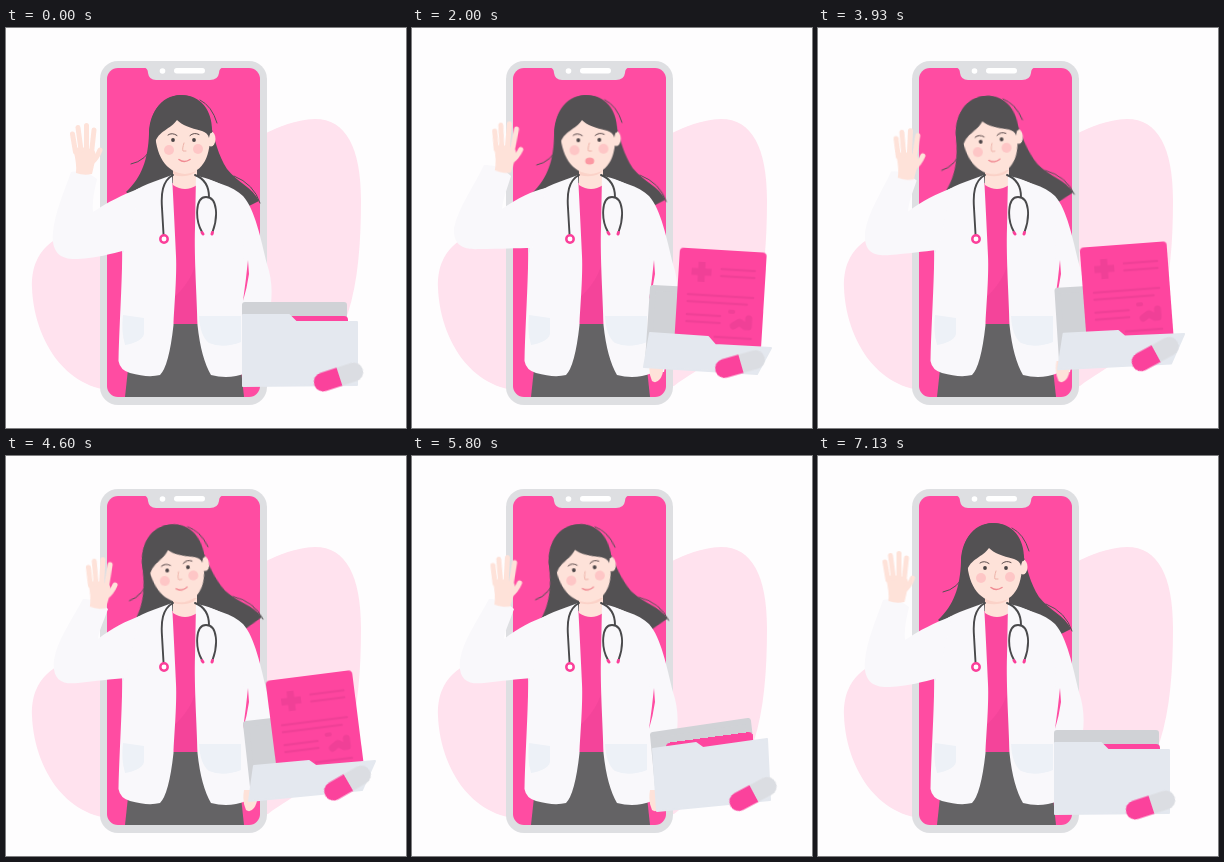
An HTML page for the animation above (7200 ms loop, 400 by 400 pixels).

```html
<!DOCTYPE html>
<html lang="en">
<head>
<meta charset="utf-8">
<title>Online doctor</title>
<style>
html, body { margin: 0; width: 100%; height: 100%; overflow: hidden; background: #fefdfe; }
svg { display: block; width: 100%; height: 100%; }
.line { fill: none; stroke-linecap: round; stroke-linejoin: round; }
.hair { fill: #535153; }
.skin { fill: #fee2d9; }
.coat { fill: #f9f8fb; }
.screen { fill: #ff4ca2; }
.move { animation: 7.2s linear infinite; }

.head { transform-origin: 180px 150px; animation-name: head; }
.hand { transform-origin: 78px 143px; animation-name: hand; }
.sleeve { animation-name: sleeve; }
.talk { transform-origin: 178px 133px; animation-name: talk; }
.smile { animation-name: smile; }
.back { animation-name: back; }
.front { animation-name: front; }
.paper { animation-name: paper; }
.pill { animation-name: pill; }
.grip { animation-name: grip; }

@keyframes head {
  0%, 3%, 100% { transform: rotate(0deg); }
  15.7%, 18% { transform: rotate(-9deg); }
  27.8% { transform: rotate(-1deg); }
  32% { transform: rotate(0deg); }
  44.4% { transform: rotate(-4deg); }
  63.9%, 70% { transform: rotate(-9deg); }
  80.6% { transform: rotate(-8deg); }
  99% { transform: rotate(0deg); }
}
@keyframes hand {
  0%, 100% { transform: translate(0, 0); }
  5% { transform: translate(-3px, 0) rotate(-2deg); }
  15.7% { transform: translate(11px, -5px) rotate(5deg); }
  27.8% { transform: translate(13px, -2px) rotate(5deg); }
  42% { transform: translate(5px, 3px) rotate(2deg); }
  44.4% { transform: translate(5.5px, 4px) rotate(2deg); }
  63.9%, 69% { transform: translate(14px, 6px) rotate(3deg); }
  80.6% { transform: translate(12.5px, 4px) rotate(3deg); }
  99% { transform: translate(.5px, 0); }
}
@keyframes sleeve {
  0%, 5%, 99%, 100% { d: path("M134 160C116 167 102 174 87 184C86 174 88 164 91 151Q78 141 65 144C58 164 49 184 47 204C45 224 54 232 72 231C90 230 105 226 120 222Z"); }
  15.7%, 27.8% { d: path("M134 160C120 163 106 170 90 181C91 171 95 161 99 148Q88 136 72 137C62 158 46 180 42 200C41 218 52 222 68 221C88 221 105 220 120 220Z"); }
  44.4% { d: path("M134 160C116 167 102 174 88 184C88 174 91 164 95 152Q83 142 69 144C61 164 49 184 46 204C45 223 54 228 72 227C90 226 105 224 120 222Z"); }
  63.9%, 80.6% { d: path("M134 160C120 165 106 172 92 183C93 174 98 165 102 153Q91 142 77 143C66 164 51 184 48 204C46 223 55 229 72 227C90 225 105 223 120 222Z"); }
}
@keyframes talk {
  0%, 9%, 33%, 100% { opacity: 0; transform: scale(1, .3); }
  12%, 21%, 30% { opacity: 1; transform: scale(1, .7); }
  15.7%, 18%, 24%, 27.8% { opacity: 1; transform: scale(1); }
}
@keyframes smile {
  0%, 9%, 33%, 100% { opacity: 1; }
  12%, 30% { opacity: 0; }
}
@keyframes back {
  0%, 99%, 100% { d: path("M239 277L338 277L338 300L239 354Z"); }
  11% { d: path("M239 275L338 277L338 300L237 352Z"); }
  15.7% { d: path("M239 267L338 270L338 300L236 346Z"); }
  22%, 27.8% { d: path("M241 260L339 265L335 325L236 333Z"); }
  44.4% { d: path("M239 257L338 257L338 318L240 331Z"); }
  63.9% { d: path("M240 268L336 257L347 315L248 340Z"); }
  71%, 80.6% { d: path("M241 279L336 265L340 300L248 351Z"); }
}
@keyframes front {
  0%, 99%, 100% { d: path("M237 287L283 287L290 294L351 294L351 357L237 358Z"); }
  11% { d: path("M237 286L284 286L291 293L352 295L350 356L235 355Z"); }
  15.7% { d: path("M238 283L287 285L294 291L352 295L349 351L234 349Z"); }
  22%, 27.8% { d: path("M238 305L296 309L303 317L359 320L345 346L232 339Z"); }
  44.4% { d: path("M243 301L297 301L303 307L363 307L350 337L237 337Z"); }
  63.9% { d: path("M248 310L303 305L310 310L369 305L356 334L243 345Z"); }
  71%, 80.6% { d: path("M241 293L284 287L291 292L355 283L358 344L245 355Z"); }
}
@keyframes paper {
  0%, 99%, 100% { transform: translate(255px, 288px); }
  11% { transform: translate(255px, 286px) rotate(1deg); }
  15.7% { transform: translate(254px, 276px) rotate(2.5deg); }
  22%, 27.8% { transform: translate(268px, 219.5px) rotate(3.5deg); }
  44.4% { transform: translate(264px, 214px) rotate(-1.2deg); }
  63.9% { transform: translate(259.5px, 225px) rotate(-7.2deg); }
  71%, 80.6% { transform: translate(254px, 287px) rotate(-7.5deg); }
}
@keyframes pill {
  0%, 99%, 100% { transform: translate(332.5px, 349px) rotate(-18deg); }
  11% { transform: translate(331px, 347px) rotate(-17deg); }
  15.7% { transform: translate(329px, 344px) rotate(-16deg); }
  22%, 27.8% { transform: translate(328px, 336px) rotate(-16deg); }
  44.4% { transform: translate(332.5px, 325px) rotate(-27deg); }
  63.9% { transform: translate(341.5px, 327px) rotate(-30deg); }
  71%, 80.6% { transform: translate(341px, 338px) rotate(-28deg); }
}
@keyframes grip {
  0%, 99%, 100% { transform: translate(2px, 2px); }
  15.7%, 27.8% { transform: translate(0, 0); }
  44.4% { transform: translate(1px, -1px); }
  63.9%, 80.6% { transform: translate(0, 1px); }
}
</style>
</head>
<body>
<svg viewBox="0 0 400 400">
  <defs>
    <clipPath id="pocket"><path d="M220 180H390V332H220Z"/></clipPath>
  </defs>

  <path fill="#ffe2ee" d="M50 211C32 222 25 240 26 260C28 310 58 362 112 363C170 366 220 365 262 358C285 340 328 322 342 285C352 254 355 215 355 172C355 120 340 91 309 91C288 92 275 98 256 107L130 200Z"/>

  <!-- phone -->
  <rect x="94" y="33" width="167" height="344" rx="18" fill="#dedfe2"/>
  <rect class="screen" x="101" y="40" width="153" height="329" rx="11"/>
  <path fill="#dedfe2" d="M137 39Q142 40 142 45Q143 52 150 52H204Q212 52 213 45Q213 40 218 39Z"/>
  <circle cx="156.500" cy="43" r="2.800" fill="#fff"/>
  <rect x="168" y="40" width="31" height="5.500" rx="2.700" fill="#fff"/>

  <g class="head move">
    <path class="hair" d="M174 67C154 69 143 86 143 106C142 131 136 149 120 164L140 182H235L253 173C247 160 231 154 221 141C212 127 209 112 205 98C202 80 192 67 174 67Z"/>
    <path class="line" stroke="#535153" stroke-width="1" d="M147 117Q140 133 125 136M194 72Q206 78 211 95M228 148Q248 156 254 175"/>
  </g>

  <!-- body -->
  <path fill="#646365" d="M127 295H230L238 369H119Z"/>
  <path fill="#fb489f" d="M162 155H196V296H162Z"/>
  <path fill="#ef4398" d="M192 226Q188 252 167 270V296H192Z" opacity=".55"/>
  <path class="skin" d="M167 138H191V157Q179 165 167 157Z"/>
  <path fill="#fbd2c8" d="M167 142H191Q184 151 167 147Z"/>

  <path class="coat" d="M190 148C207 153 227 158 237 168C249 181 255 212 261 236C267 254 267 272 262 292L252 344H238L238 240Z"/>
  <path class="coat" d="M166 147C150 153 132 158 122 168C114 186 117 215 116 240C115 275 113 306 112.500 333Q114 342 124 345Q142 350 154 347Q163 338 167.500 297C168 280 171 250 170 228Q168 185 166 147Z"/>
  <path class="coat" d="M190 148C213 152 232 164 237 182L240 345Q223 352 205 347Q195 330 191.500 297C191 270 188 230 189 200Z"/>
  <path class="screen" d="M242 232L243 246Q241 260 237 273Q240 252 242 232Z"/>
  <path class="line" stroke="#eceff5" stroke-width="1.500" d="M118 190Q119 207 117 224"/>
  <path fill="#edf1f7" d="M117 287L138 290V306Q136 314 119 317Q115 303 117 287ZM193 288L235 288V314Q217 321 203 315Q194 308 193 288Z"/>
  <path class="coat sleeve move" d="M134 160C116 167 102 174 87 184C86 174 88 164 91 151Q78 141 65 144C58 164 49 184 47 204C45 224 54 232 72 231C90 230 105 226 120 222Z"/>

  <g class="hand move">
    <path class="skin" d="M67 121Q75 117 88 122Q91 126 89 133L86 146Q78 148 70 145Q71 135 67 121Z"/>
    <path class="line" stroke="#fee2d9" stroke-width="5" d="M69.500 124L66.500 106M75 122L72 99.500M80.500 122L80.500 97.500M85.500 125L88 102"/>
    <path class="line" stroke="#fee2d9" stroke-width="5" d="M86 134Q91 130 94 122"/>
  </g>

  <!-- stethoscope -->
  <g class="line" stroke="#49494b" stroke-width="1.900">
    <path d="M167 147C156 153 155 166 156 180L157.500 206M189 147C199 151 203 158 203 169M196 204C189 192 189 169 200 169C212 169 212 190 206.500 204"/>
    <circle cx="158" cy="211" r="3.700" fill="#fff" stroke="#fb3f9a" stroke-width="2.500"/>
    <path stroke="#fb3f9a" stroke-width="3" d="M196 204.500L197 206M206.500 204.500L206 206"/>
  </g>

  <g class="head move">
    <ellipse class="skin" cx="205" cy="111" rx="4.500" ry="7.500"/>
    <path class="skin" d="M149 101C149 84 203 80 204 104C205 126 198 145 179 146C160 145 149 127 149 101Z"/>
    <path class="hair" d="M144 121C140 94 150 67 175 67C196 67 207 84 206 105Q204 104 203 110Q202 105 196 103C184 100 176 97 171 92C165 101 152 103 149 115Z"/>
    <g class="line" stroke="#5b4b4c" stroke-width="1">
      <path d="M162 107Q166 104 171 107.500M184 107.500Q188 104 193 106.500"/>
      <path stroke="#eeb3a9" d="M178 115Q176 121 177 123H180"/>
    </g>
    <g fill="#4a4345"><circle cx="167" cy="112" r="1.900"/><circle cx="188" cy="112" r="1.900"/></g>
    <g fill="#fec6c6"><circle cx="163" cy="122" r="5"/><circle cx="192" cy="121" r="5"/></g>
    <path class="smile line move" stroke="#f08a92" stroke-width="1.500" d="M173 131.500Q178 135.500 184 131.500"/>
    <ellipse class="talk move" cx="178" cy="133" rx="4.500" ry="3.600" fill="#fc98a3"/>
  </g>

  <!-- folder -->
  <path class="grip skin move" d="M238 333H250Q253 344 248 351Q244 356 240 353Q236 345 238 333Z"/>
  <path class="back move" fill="#d0d2d6" stroke="#d0d2d6" stroke-width="6" stroke-linejoin="round" d="M239 277L338 277L338 300L239 354Z"/>
  <g clip-path="url(#pocket)">
    <g class="paper move">
      <rect width="87" height="97" rx="4" fill="#fe459f"/>
      <g class="line" stroke="#f04097">
        <path stroke-width="7" style="stroke-linecap:butt" d="M13 23H33M23 13V33"/>
        <path stroke-width="2.500" d="M43 19H76M43 26H76M11 46H76M11 53H70M11 66H44M11 73H44M40 87H76"/>
        <path stroke-width="7" d="M58 75L64 71L70 75H73V67"/>
        <path stroke-width="4" d="M54 61H57"/>
      </g>
    </g>
  </g>
  <path class="front move" fill="#e4e8ef" stroke="#e4e8ef" stroke-width="2" stroke-linejoin="round" d="M237 287L283 287L290 294L351 294L351 357L237 358Z"/>
  <g class="pill move">
    <path fill="#dbdde2" d="M0 -9.500H16A9.500 9.500 0 0 1 16 9.500H0Z"/>
    <path fill="#fb429c" d="M1 -9.500H-16A9.500 9.500 0 0 0 -16 9.500H1Z"/>
  </g>
</svg>
</body>
</html>
```
